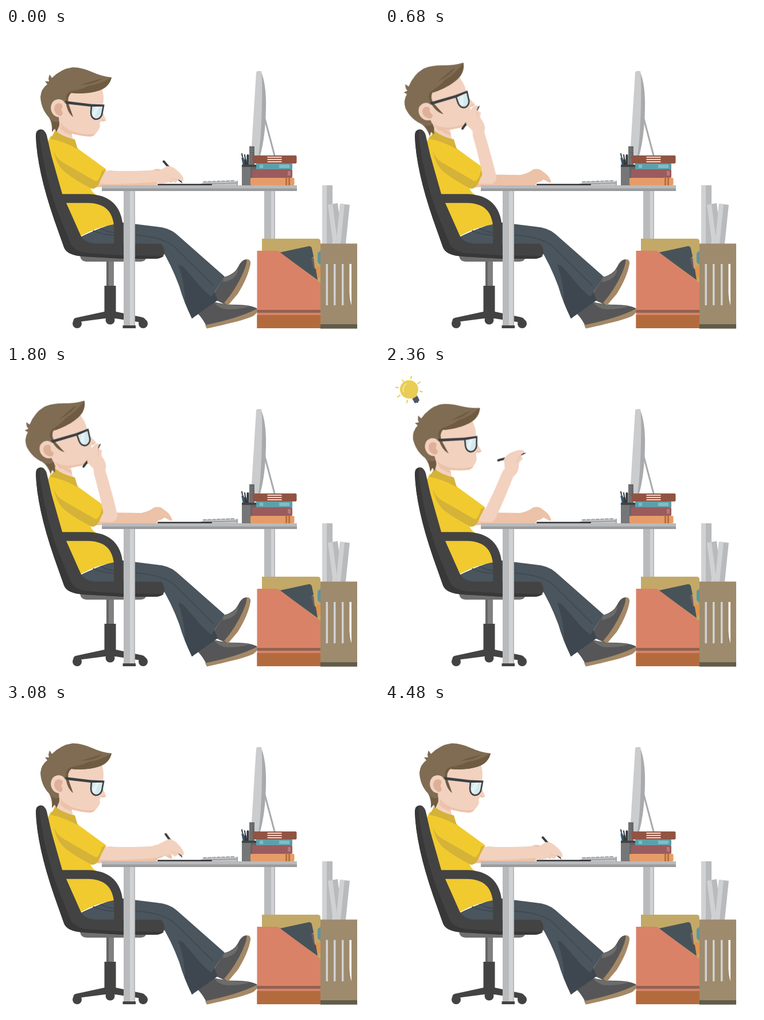
Animation of 650x540 px, one loop 4.56 s. Source, as an HTML page without scripts:

```html
<!DOCTYPE html>
<html lang="en">
<head>
<meta charset="utf-8">
<title>Idea at the desk</title>
<style>
html, body { margin: 0; width: 100%; height: 100%; overflow: hidden; background: #fff; }
svg { display: block; width: 650px; height: 540px; }

.skin { fill: #f2d1bf; } .shade { fill: #ecc2a8; }
.hair { fill: #7f6c53; } .lock { fill: #6e5b42; }
.shirt { fill: #f1ca2f; } .fold { fill: #d5b238; }
.jean { fill: #4a555d; } .deep { fill: #3e474f; }
.dark { fill: #434343; } .black { fill: #383838; }
.lite { fill: #d0d1d3; } .grey { fill: #b9babc; } .iron { fill: #9a9b9d; }
.line { fill: none; stroke-linecap: round; stroke-linejoin: round; }

#head, #arm, #hand, #bulb { animation: 4.56s cubic-bezier(.37,0,.63,1) infinite; }
#head { transform-origin: 97.2px 189.7px; animation-name: lean; }
#arm { transform-origin: 182px 260px; animation-name: lift; }
#hand { transform-origin: 307px 270px; animation-name: write; }
#bulb { transform-origin: 42px 41px; animation-name: idea; animation-timing-function: linear; }

@keyframes lean {
  0%, 53.95%, 100% { transform: rotate(0deg); }
  7.24%, 49.12% { transform: rotate(-23deg); }
}
/* raise the forearm, rub the chin five times, lower it */
@keyframes lift {
  0%, 3.51%, 55.4%, 100% { transform: rotate(0deg); }
  13.16%, 20.18%, 27.19%, 34.21%, 41.23%, 48.25%, 49.3% { transform: rotate(-99.5deg); }
  16.67%, 23.68%, 30.7%, 37.72%, 44.74% { transform: rotate(-105.5deg); }
}
@keyframes write {
  0%, 63.16%, 71.93%, 80.7%, 89.47%, 98.25%, 100% { transform: translate(0, 0) rotate(0deg); }
  67.54%, 76.32%, 85.09%, 93.86% { transform: translate(0, -3px) rotate(5deg); }
}
@keyframes idea {
  0%, 40.35%, 64.04%, 100% { transform: scale(0); }
  45.61%, 57.89% { transform: scale(1); }
}
</style>
</head>
<body>
<svg viewBox="0 0 650 540">

  <g id="bulb">
    <path fill="#545e70" d="M47 56L56 51L60 60L58 62L58 64L55 64L52 65Z"/>
    <path class="line" stroke="#3f4858" d="M49 59L58 55M51 62L59 58"/>
    <path fill="#e9cd54" d="M58 41A16 16 0 1 0 43 56.700Q46 56 48 57L56 52Q55 49 57 46Q58 43 58 41Z"/>
    <path class="line" stroke="#f4e49c" stroke-width="2" d="M32 45Q30 36 37 31"/>
    <path class="line" stroke="#e9cd54" stroke-width="2" d="M46 18L45 22M30 24L33 28M19 37L23 38M22 54L26 51M38 64L39 60M61 28L57 31M65 45L61 44"/>
  </g>

  <!-- screen -->
  <path class="line" stroke="#a9aaac" stroke-width="3" d="M451 158L468 222"/>
  <path fill="#a9aaac" d="M444 75Q454 98 453 140Q452 190 443 222H437Z"/>
  <path fill="#cbccce" d="M436 77Q437 75 439 75H445Q447 90 446 130Q445 190 440 222H427Z"/>

  <!-- pencil cup -->
  <path class="line" stroke="#38566a" stroke-width="4" d="M412.500 227L415 240"/>
  <path class="line" stroke="#35393c" stroke-width="4" d="M417 230L418 240M421.500 222V240"/>
  <path class="line" stroke="#35393c" stroke-width="2" d="M411 219L412 224M416 221L417 228"/>
  <rect fill="#6f7072" x="424" y="206" width="9" height="34"/>
  <path class="line" stroke="#4c4d4f" d="M429 209H432M430 213H432M429 217H432M430 221H432M429 225H432M430 229H432"/>
  <rect fill="#757678" x="411" y="239" width="26" height="35"/>
  <rect fill="#646567" x="426" y="239" width="11" height="35"/>
  <rect class="dark" x="411" y="238" width="26" height="4"/>

  <!-- books -->
  <rect fill="#915443" x="430" y="222" width="76.500" height="14" rx="2"/>
  <path stroke="#ead9d2" stroke-width="2" d="M455.500 225H480.500M455.500 229H480.500M455.500 233H480.500"/>
  <rect fill="#5e9fa9" x="436" y="236" width="63" height="10"/>
  <path fill="#84bcc5" d="M442 238h6v6h-6zM476 238h18v6h-18z"/>
  <rect fill="#9a5b5e" x="429" y="246" width="70" height="15" rx="2"/>
  <rect fill="#b57a7a" x="491" y="249" width="5" height="8"/>
  <rect fill="#e59c68" x="426" y="261" width="76.500" height="13" rx="2"/>
  <path fill="#b4713f" d="M487 260h3v14h-3zM492 260h3v14h-3z"/>

  <!-- keyboard -->
  <path fill="#c3c4c6" d="M339 273L345 268L403 266.500L404 274H339Z"/>
  <path class="line" stroke="#a2a3a5" stroke-width="2" stroke-dasharray="5 3" stroke-linecap="butt" d="M344 268L398 266"/>
  <path stroke="#97989a" stroke-width="1.500" d="M339 272L404 270M403 266V274"/>

  <!-- storage -->
  <rect class="grey" x="551" y="274" width="18" height="102"/>
  <rect class="lite" x="551" y="274" width="8" height="102"/>
  <path class="grey" d="M561 308L578 305L587 376H570Z"/>
  <path class="lite" d="M561 308L569 306.500L578 376H570Z"/>
  <path class="grey" d="M582 306L599 308L592 376H575Z"/>
  <path class="lite" d="M582 306L590 307L583 376H575Z"/>

  <!-- far desk leg -->
  <rect class="grey" x="450" y="283" width="19" height="84"/>
  <rect class="lite" x="462" y="283" width="5" height="84"/>

  <!-- chair stand -->
  <path fill="#6f6f6f" d="M129 396H245Q245 407 234 407H140Q130 407 129 396Z"/>
  <rect fill="#808080" x="175" y="407" width="13" height="43"/>
  <rect fill="#666" x="175" y="407" width="4" height="43"/>
  <path class="dark" d="M172 494L121 505Q116 507 118 513L172 506H191L243 514Q245 506 238 504L191 494Z"/>
  <rect class="dark" x="171.500" y="449" width="20" height="56"/>
  <g class="dark"><circle cx="124" cy="515" r="8"/><circle cx="239" cy="515" r="8"/><circle cx="181.500" cy="508.500" r="8"/></g>

  <!-- shoes -->
  <path fill="#565658" d="M334 497L362 477Q380 482 403 482Q425 482 437 488Q439 492 424 499L349 519Q344 508 334 497Z"/>
  <path fill="#6c6d6b" d="M362 477Q380 483 426 484Q412 490 386 490Q370 489 362 477Z"/>
  <path fill="#a48866" d="M347 517.500Q404 506 438 489Q440 495 433 500Q426 507 350 523.500Z"/>
  <path fill="#565658" d="M380 434Q398 429 404 417Q410 404 418 403Q427 403 425 413Q419 437 401 462L383 482L357 470Z"/>
  <path fill="#6c6d6b" d="M379 434Q400 430 404 418Q406 437 378 443Z"/>
  <path fill="#a48866" d="M419 403Q427 402 426 411Q422 434 404 463L387 483L380 479Q400 456 413 427Q421 408 419 403Z"/>

  <!-- trousers -->
  <path class="jean" d="M268 380Q288 412 302 450Q310 478 324 506L369 474L340 410Z"/>
  <path class="deep" d="M300 412Q312 445 312 478L324 506L369 474L350 430Z"/>
  <path class="jean" d="M118 370Q160 348 197 338L262 346Q285 348 297 359L381 433L358 468Q344 458 330 440L284 387L200 385H124Z"/>
  <path class="line" stroke="#3e474f" stroke-width="1.500" d="M152 353Q175 364 215 360Q270 362 292 380L361 448M165 349Q178 356 188 356"/>

  <!-- torso -->
  <path class="skin" d="M86 165L113 172Q113 183 117 194L108 198L83 184Z"/>
  <path class="shade" d="M92 172L114 182L115 187Q100 183 92 172Z"/>
  <path class="shirt" d="M78 188L104 194L125 209L150 262L148 281Q152 290 172 299Q188 320 188 342Q158 347 131 362L116 356L72 200Z"/>

  <!-- far arm -->
  <path class="shade" d="M148 278L170 255L236 256Q250 253 257 247Q267 243 275 250Q286 257 289.500 267Q289 272 284 268L276 264Q272 268 265 269L262 274H240L168 277Z"/>
  <path class="skin" d="M158 250L182 248A12 12 0 0 1 182 272L160 271Z"/>
  <path class="fold" d="M84 216Q88 239 104 252Q125 268 150 280Q160 280 165 264L174 247Z"/>
  <path class="shirt" d="M82 196L104 198L125 210L174.500 246L165 263Q158 270 151 264L104 237Q86 228 84 213Z"/>
  <path class="fold" d="M174 246L167 249Q164 266 147 277L151 280Q160 278 165 263Z"/>
  <path class="fold" d="M86 179Q100 190 120 194L125 211Q100 197 77 193Z"/>

  <g id="head">
    <path class="skin" d="M94 118L166 102Q172 118 169 134L169 147L174.500 161Q172 163 166 162Q162 165 164 171Q163 177 156 184Q152 190 144 189Q118 187 98 174L86 155Z"/>
    <path class="shade" d="M94 164Q106 179 126 183Q143 187 156 184Q152 190 144 189Q118 187 98 178Z"/>
    <path class="shade" d="M167 159L174 161Q171 164 166 162Z"/>
    <path class="hair" d="M80 181Q81 166 75 156Q61 141 60 120Q61 106 72 98L68 93L75 93Q73 88 76 81L80 87Q96 71 116 68.500Q131 68 151 77Q166 84 184 86Q180 103 162 109Q140 116 112 113Q103 118 104 129L92 155L93 170L88 181L85 175Z"/>
    <path class="lock" d="M104 127Q103 114 113 110Q132 107 143 101Q162 99 184 86Q180 103 162 109Q140 116 114 113Q106 119 109 132L117 155Q106 147 104 127Z"/>
    <path class="lock" d="M79 160Q86 166 93 163L92 171L88 181L85 175L80 181Q82 170 79 160ZM130 99Q155 98 168 88Q154 91 130 99Z"/>
    <path class="skin" d="M92 124Q104 125 104 139Q103 156 94 156Q79 154 78 139Q79 125 92 124Z"/>
    <path fill="#dfb098" d="M93 131Q101 133 98 139Q95 142 99 148Q98 154 93 153Q84 149 84 140Q85 131 93 131Z"/>
    <path fill="#d4e9ec" d="M149 135.500L169 135.500L166 152Q163 159 156 159Q148 157 148 147Z"/>
    <path fill="#e6f2f4" d="M157 137H163L154 156Q150 153 150 149Z"/>
    <path class="line" stroke="#3c4043" stroke-width="2.600" d="M149 135.500L170 135L167 151Q164 159 156 159Q148 157 148 147Z"/>
    <path fill="#3c4043" d="M103 127L148 132.500L171.500 133.500L171 136.500L148 137L104 132Z"/>
  </g>

  <!-- chair seat and back -->
  <path class="dark" d="M52 188Q52 177 61 176.500Q68 177 71 187L79 222L98 289L130 361Q136 374 155 375.500L270 376Q277 382 276 393Q273 402 258 402H205L135 398Q106 396 101 382L84 334Q54 247 52 188Z"/>
  <path class="black" d="M52 188Q52 177 61 176.500Q57 181 60 199Q68 258 89 318L112 374Q117 388 140 392L202 396L275 397Q270 402 258 402H205L135 398Q106 396 101 382L84 334Q54 247 52 188Z"/>
  <path fill="none" stroke="#434343" stroke-width="15.500" d="M96 297H143Q193 298 196 347V382"/>

  <!-- desk -->
  <rect class="grey" x="205" y="283" width="20" height="235"/>
  <rect class="lite" x="216" y="283" width="7" height="235"/>
  <rect class="dark" x="203.500" y="518" width="22.500" height="5"/>
  <rect class="grey" x="167" y="274" width="340" height="10"/>
  <rect class="iron" x="167" y="279.500" width="340" height="4.500"/>
  <rect fill="#333538" x="264" y="271.500" width="95" height="2.500" rx="1"/>

  <g id="arm">
    <path class="skin" d="M182 248.500Q215 250 258 247.500Q272 248 274 256Q273 266 262 268Q230 271 182 272A11.750 11.750 0 0 1 182 248.500Z"/>
    <g id="hand">
      <path class="line" stroke="#3a3b3d" stroke-width="4" d="M275 232.500L302 264"/>
      <path fill="#3a3b3d" d="M300 265L304 262L307.500 271Z"/>
      <path class="skin" d="M256 256Q268 248 281 240.500Q290 240 298 248Q309 257 309.500 265Q307 269 301 264L295 270Q289 266 284 268Q273 274 262 269L256 266Z"/>
      <path class="line" stroke="#e8bfa8" d="M287 262Q294 263 300 264"/>
    </g>
  </g>

  <!-- folders -->
  <path fill="#c3a967" d="M446 367H543Q548 367 548 372V450H446Z"/>
  <path fill="#5e94a0" d="M543 392L548 388V413L543 408Z"/>
  <path fill="#dd9450" d="M535 418L548 414V434L540 437Z"/>
  <path fill="#745a68" d="M530 402L536 400L538 418L533 420Z"/>
  <path fill="#485359" d="M477 391L528 380Q532 380 533 384L536 398L532 402L536 417L540 420L543 439Z"/>
  <path fill="#d98267" d="M437.500 388H474L548 444V523H437.500Z"/>
  <rect fill="#8f6350" x="437.500" y="491" width="110.500" height="5"/>
  <rect fill="#b36b3d" x="437.500" y="500" width="110.500" height="23"/>
  <rect fill="#9e8b6d" x="548" y="375.500" width="64" height="148"/>
  <rect fill="#5f5c4c" x="548" y="516" width="64" height="7.500"/>
  <path class="lite" d="M557.500 411h3.500v72h-3.500zM571 411h3.500v72h-3.500zM585 411h3.500v72h-3.500z"/>
  <path fill="#fff" d="M598.500 411H602V483Q599 474 598.500 460Z"/>
</svg>
</body>
</html>
```
